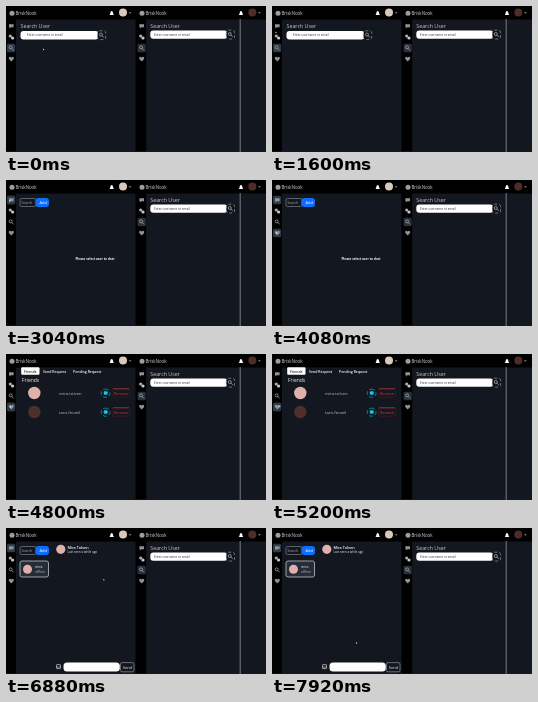
An HTML page for the animation above (8000 ms loop, 260x146 px).

```html
<!DOCTYPE html>
<html lang="en">
<head>
<meta charset="utf-8">
<style>
html, body { margin: 0; width: 100%; height: 100%; overflow: hidden; background: #000; }
svg { display: block; width: 260px; height: 146px; font-family: "Open Sans", "Noto Sans", sans-serif; }
.icon { fill: none; stroke: #a4a8ae; stroke-width: .8; }
.solid { fill: #8f949b; }
</style>
</head>
<body>
<svg id="stage" viewBox="0 0 260 146"></svg>
<script>
const stage = document.getElementById('stage');
const PANEL = '#13171f', LIGHT = '#f1f2f4', PINK = '#e0b0ab', BROWN = '#4b302b', CYAN = '#0dcaf0';

const rect = (x, y, w, h, fill, r = 0, extra = '') =>
  `<rect x="${x}" y="${y}" width="${w}" height="${h}" rx="${r}" fill="${fill}" ${extra}/>`;
const outline = (x, y, w, h, color, r = 0) =>
  rect(x, y, w, h, 'none', r, `stroke="${color}" stroke-width=".6"`);
const dot = (x, y, r, fill, extra = '') => `<circle cx="${x}" cy="${y}" r="${r}" fill="${fill}" ${extra}/>`;
const text = (x, y, size, str, fill = LIGHT, extra = '') =>
  `<text x="${x}" y="${y}" font-size="${size}" fill="${fill}" ${extra}>${str}</text>`;
const path = (d, attrs) => `<path d="${d}" ${attrs}/>`;
const group = (id, body) => `<g id="${id}">${body}</g>`;
const lens = (x, y) => path(`M${x + 1} ${y + 1}l2 2`, 'class="icon"') + dot(x, y, 1.5, 'none', 'class="icon"');

const bubble = (x, y, w = 4) =>
  path(`M${x - w / 2} ${y - 1.8}h${w}v3h-${w * .6}l-1.2 1.2v-1.2h-${w * .4 - 1.2}z`, 'class="solid"');

function sideIcons(x) {
  return bubble(x, 20, 4.6) +
    dot(x - 1, 30, 1.6, '#a9adb4') + dot(x + 1.3, 32, 1.6, '#c5c8cc') +
    lens(x - .6, 41.4) +
    path(`M${x} 55.4l-2.4-2.5q-.7-1.9 1-2.1q1 0 1.4 .9q.4-.9 1.4-.9q1.7 .2 1 2.1z`, 'class="solid"');
}

function header(x, bell, avatar, face) {
  return dot(x + 6, 7.3, 2.5, '#9a9da2') + text(x + 9.5, 8.8, 4.4, 'BriskNook', '#d4d6d9') +
    path(`M${bell - 2.3} 9q1-1 1-2.5q.2-1.4 1.3-1.6q1.1 .2 1.3 1.6q0 1.5 1 2.5z`, 'fill="#fff"') +
    dot(avatar, 6.6, 4, face) +
    path(`M${avatar + 5.8} 6.3h2.6l-1.3 1.5z`, 'fill="#999"');
}

function searchPage(x, y, w, hint) {
  return text(x, y - 2.8, 5.3, 'Search User', '#c4c7cc') +
    rect(x, y, w, 8.4, '#fff', 3) +
    text(hint, y + 5.4, 3.1, 'Enter username or email', '#333') +
    rect(x + w - 1, y - .2, 8.2, 8.8, '#10141b', 2, 'stroke="#aeb2b8" stroke-width=".6" stroke-dasharray="3 2"') +
    lens(x + w + 2.5, y + 3.6);
}

const addBar = outline(14, 18.5, 16, 8, '#8c9097', 1.5) + text(15.5, 24, 3.4, 'Search', '#a5a8ad') +
  rect(29.5, 18, 13.5, 9, '#0d6efd', 3) + text(33.5, 24.2, 4, 'Add', '#fff');

const emptyChat = addBar + text(89, 80.4, 3.1, 'Please select user to chat', '#fff', 'text-anchor="middle" font-weight="700"');

function friendRow(y, face, name, id) {
  return dot(28.3, y, 6.2, face) + text(53, y + 1.5, 4.3, name, '#b9bcc2') +
    group(id, rect(95.2, y - 3.8, 8.8, 8, '#11191f', 4, `stroke="${CYAN}" stroke-width=".6" stroke-dasharray="4 2"`) +
      rect(97.8, y - 1.7, 3.8, 3.4, CYAN, 1)) +
    outline(106.5, y - 4.2, 17, 8.4, '#4a1d25', 1.5) + rect(107, y - 4.5, 16, .7, '#c23540') +
    text(115, y + 1.5, 3.7, 'Remove', '#dc3545', 'text-anchor="middle"');
}

const tab = (x, str, fill = '#fff') => text(x, 18.6, 3.5, str, fill, 'font-weight="600"');
const friendsPage = rect(15.2, 13.3, 18.3, 7.4, '#fff', 1) +
  tab(18, 'Friends', '#222') + tab(37, 'Send Request') + tab(67, 'Pending Request') +
  text(16, 27.5, 5, 'Friends') +
  friendRow(39, PINK, 'mira.tolven', 'chatButton') + friendRow(58, BROWN, 'taro.fenwil', 'chatButton2');

const chatPage = addBar +
  rect(14, 33, 28.5, 16, '#252c37', 2, 'stroke="#d3d7dc" stroke-width=".7"') +
  dot(21.5, 41.3, 4.5, PINK) + text(29, 40.2, 3.5, 'mira') + text(29, 45.3, 3.3, 'offline', '#b4b8be') +
  dot(54.8, 21.3, 4.6, PINK) + text(61.5, 21, 3.8, 'Mira Tolven', '#fff', 'font-weight="600"') +
  text(61.5, 25.4, 3, 'Last seen a while ago', LIGHT) +
  outline(50.5, 136.6, 4, 4, LIGHT, .6) + path('M50.8 140.1l1.2-1.5l.8 .8l.7-.7l1 1.4', 'class="icon"') +
  rect(57.5, 134.6, 56.3, 9, '#fff', 3.5) +
  outline(114.5, 134.6, 13.5, 9.2, '#a5a9af', 1.5) + text(116.7, 140.8, 4, 'Send');

stage.innerHTML =
  rect(0, 0, 260, 146, '#000') +
  rect(10, 13.5, 119.5, 132.5, PANEL) + rect(140.2, 13.5, 119.8, 132.5, PANEL) +
  rect(0, 145.3, 260, .7, '#2c1013') +
  rect(1, 0, 8.2, 8.5, '#303a46', 1.5, 'id="active"') +
  rect(1, 0, 8.2, 8.5, '#303a46', 1.5, 'id="hover"') +
  rect(131.5, 37.7, 8.2, 8.5, '#29313c', 1.5) +
  sideIcons(5.3) + sideIcons(135.7) +
  header(0, 105.7, 117, '#d8cbbd') + header(130, 235, 246.3, '#512b29') +
  searchPage(144.3, 24.4, 77, 148) + rect(233.7, 13, .9, 133, '#85888c') +
  group('search', searchPage(14.5, 25, 78, 21)) +
  group('empty', emptyChat) + group('friends', friendsPage) + group('chat', chatPage) +
  path('M0 0v1.8l1.3-.6z', 'id="cursor" fill="#fff"');

const el = id => document.getElementById(id);
const pages = [[0, 'search', 42], [1680, 'empty', 20], [4160, 'friends', 53], [6240, 'chat', 20]];
// Pointer stops: time, x, y
const stops = [
  [0, 37, 42.5], [480, 37, 42.5], [880, 3.5, 25.5], [1600, 3.5, 25.5], [1760, 3.5, 20], [3200, 3.5, 20],
  [4000, 4, 52], [5120, 4, 52], [5840, 100, 39], [6560, 100, 39], [7840, 84, 114]
];

function pointer(t) {
  const i = stops.findIndex(s => s[0] > t);
  if (i < 0) return stops[stops.length - 1].slice(1);
  const [t0, x0, y0] = stops[i - 1], [t1, x1, y1] = stops[i];
  let p = (t - t0) / (t1 - t0);
  p = p * p * (3 - 2 * p);
  return [x0 + (x1 - x0) * p, y0 + (y1 - y0) * p];
}

function draw(now) {
  const t = now % 8000;
  const page = pages.filter(p => p[0] <= t).pop();
  for (const [, id] of pages) el(id).style.display = id === page[1] ? '' : 'none';
  const [x, y] = pointer(t);
  el('cursor').setAttribute('transform', `translate(${x} ${y})`);
  el('active').setAttribute('y', page[2] - 4.2);
  const item = [20, 31, 42, 53].find(v => Math.abs(v - y) < 4.5);
  el('hover').style.display = x < 9 && item ? '' : 'none';
  if (item) el('hover').setAttribute('y', item - 4.2);
  const over = x > 95 && x < 105 && Math.abs(y - 39) < 4;
  el('chatButton').firstChild.setAttribute('fill', over ? CYAN : '#11191f');
  el('chatButton').lastChild.setAttribute('fill', over ? '#e8fbff' : CYAN);
  requestAnimationFrame(draw);
}
requestAnimationFrame(draw);
</script>
</body>
</html>
```
